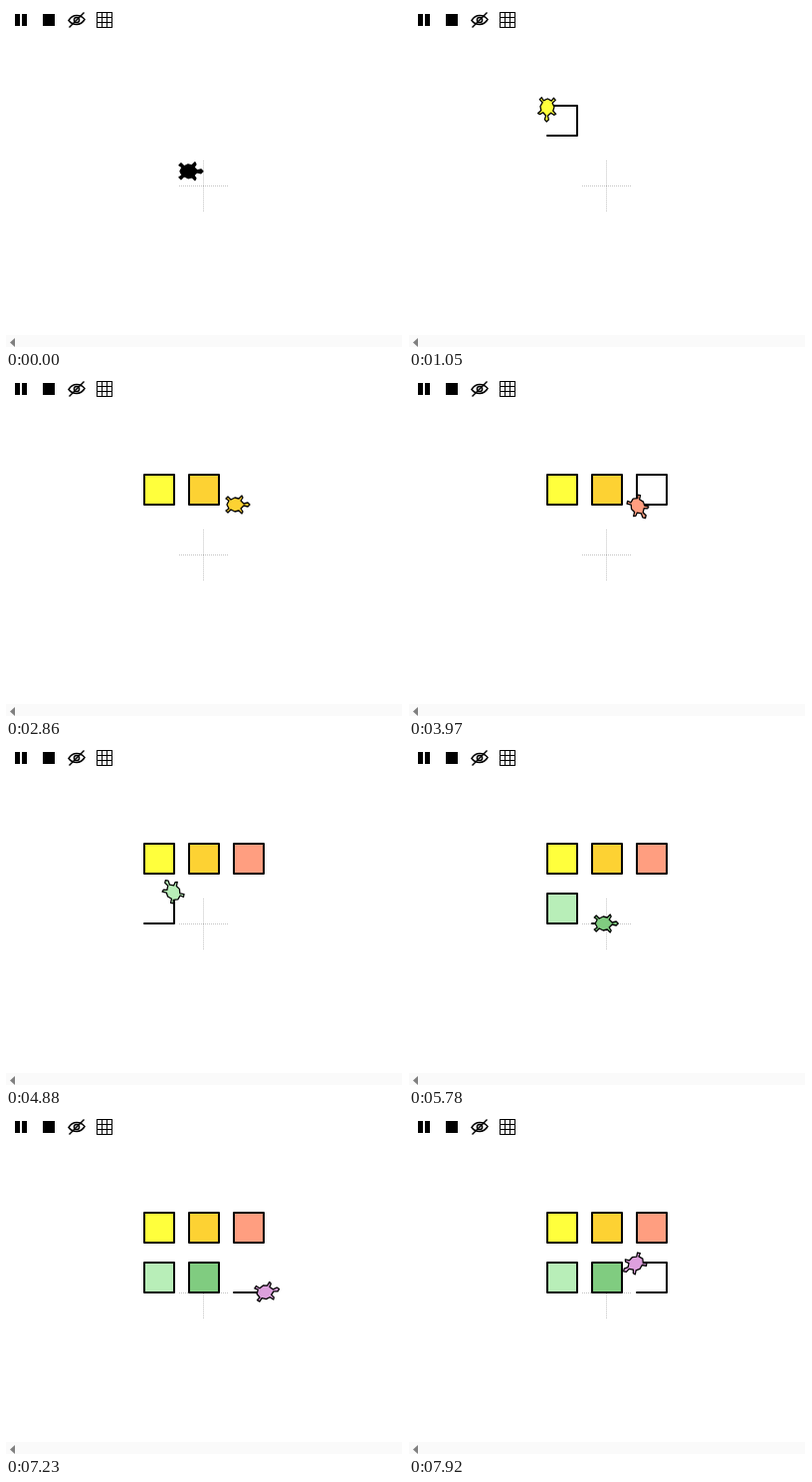
Recreate the animation shown at these times as an HTML page. Size 399 by 342 pixels, loop 7990 ms.

```html
<!DOCTYPE html>
<html lang="en">
<head>
<meta charset="utf-8">
<title>Turtle squares</title>
<style>
  html, body { margin: 0; width: 100%; height: 100%; overflow: hidden; background: #fff; }
  svg { display: block; width: 100%; height: 100%; }
</style>
</head>
<body>
<svg viewBox="0 0 399 342" xmlns="http://www.w3.org/2000/svg">
  <g id="toolbar">
    <path d="M9 8h5v12h-5zM16 8h5v12h-5zM37 8h12v12h-12z"/>
    <g fill="none" stroke="#000" stroke-width="1.5">
      <path d="M63 14.5Q66 9.500 71 9.500T79 13.500Q76 18.500 71 18.500T63 14.500Z"/>
      <circle cx="71" cy="14" r="2.600"/>
      <path d="M63.500 21.500L78.500 6.500"/>
    </g>
    <path d="M91.500 6.500h15v15h-15zM96.500 6.500v15M101.500 6.500v15M91.500 11.500h15M91.500 16.500h15" fill="none" stroke="#000" shape-rendering="crispEdges"/>
  </g>
  <rect y="330" width="398" height="12" fill="#fafafa"/>
  <path d="M4 337.500L9 333v9z" fill="#7f7f7f"/>
  <path d="M174 180.500h50M198.500 155v51" fill="none" stroke="#c4c4c4" stroke-dasharray="1 1"/>
  <g id="squares" fill="none" stroke="#000" stroke-width="2" stroke-linecap="round" stroke-linejoin="round"></g>
  <path id="turtle" stroke="#000" stroke-width="1.3" stroke-linejoin="round"/>
</svg>
<script>
const LOOP = 7990;
const STEP = 7920 / 114;
const SIDE = 30;
const SIDE_MS = 98;
const TURN_MS = 203;
const HOP_SPEED = 0.37;       // px per ms
const HOP_DELAY = 10;

const squares = [
  { x: 139, y: 130, start: 145, color: '#ffff3c' },
  { x: 184, y: 130, start: 1500, color: '#fdd233' },
  { x: 229, y: 130, start: 2886, color: '#ff9e80' },
  { x: 139, y: 180, start: 4390, color: '#b8eeb8' },
  { x: 184, y: 180, start: 5733, color: '#80cc80' },
  { x: 229, y: 180, start: 7090, color: '#dda0dd', pace: 1.07 }
];
const home = { x: 199, y: 180, end: -70, color: '#000' };

const group = document.getElementById('squares');
const turtle = document.getElementById('turtle');

for (const sq of squares) {
  sq.pace = sq.pace || 1;
  sq.end = sq.start + 4 * (SIDE_MS + TURN_MS) * sq.pace;
  sq.path = group.appendChild(document.createElementNS(group.namespaceURI, 'path'));
}

// One half of the turtle outline as [forward, sideways], mirrored for the other.
const half = [[16, 0], [14, 2], [10, 1], [7, 4], [9, 7], [8, 9], [5, 6], [1, 7],
  [-3, 5], [-6, 8], [-8, 6], [-5, 4], [-7, 0]];
const mirrored = half.slice(1, -1).reverse().map(([x, y]) => [x, -y]);
turtle.setAttribute('d', 'M' + half.concat(mirrored).join('L') + 'Z');

const clamp = v => Math.min(1, Math.max(0, v));

// Corner reached after n sides, counterclockwise from the lower left.
const corner = (sq, n) => [
  sq.x + (n === 1 || n === 2 ? SIDE : 0),
  sq.y - (n === 2 || n === 3 ? SIDE : 0)
];

function trace(sq, t) {
  const time = (t - sq.start) / sq.pace;
  const n = Math.min(3, Math.floor(time / (SIDE_MS + TURN_MS)));
  const local = time - n * (SIDE_MS + TURN_MS);
  const walked = clamp(local / SIDE_MS);
  const turned = clamp((local - SIDE_MS) / TURN_MS);
  const [x0, y0] = corner(sq, n);
  const [x1, y1] = corner(sq, (n + 1) % 4);
  const x = x0 + (x1 - x0) * walked;
  const y = y0 + (y1 - y0) * walked;
  const points = [];
  for (let i = 0; i <= n; i++) points.push(corner(sq, i));
  points.push([x, y]);
  return { x, y, angle: -90 * (n + turned), color: sq.color, d: 'M' + points.join('L') };
}

function hop(from, to, t) {
  const dx = to.x - from.x, dy = to.y - from.y;
  const p = clamp((t - from.end - HOP_DELAY) * HOP_SPEED / Math.hypot(dx, dy));
  return { x: from.x + dx * p, y: from.y + dy * p, angle: 0, color: from.color };
}

function draw(time) {
  const t = Math.min(114, Math.floor((time + 5) / STEP)) * STEP;
  let pose = hop(home, squares[0], t);
  squares.forEach((sq, i) => {
    const begun = t >= sq.start;
    const done = t >= sq.end;
    let d = '';
    if (begun) {
      pose = trace(sq, t);
      d = pose.d + (done ? 'Z' : '');
      if (done && squares[i + 1]) pose = hop(sq, squares[i + 1], t);
    }
    sq.path.setAttribute('d', d);
    sq.path.setAttribute('fill', done ? sq.color : 'none');
  });
  turtle.setAttribute('fill', pose.color);
  turtle.setAttribute('transform', `translate(${pose.x} ${pose.y}) rotate(${pose.angle})`);
}

const origin = performance.now();
function tick() {
  draw((performance.now() - origin) % LOOP);
  requestAnimationFrame(tick);
}
tick();
</script>
</body>
</html>
```
